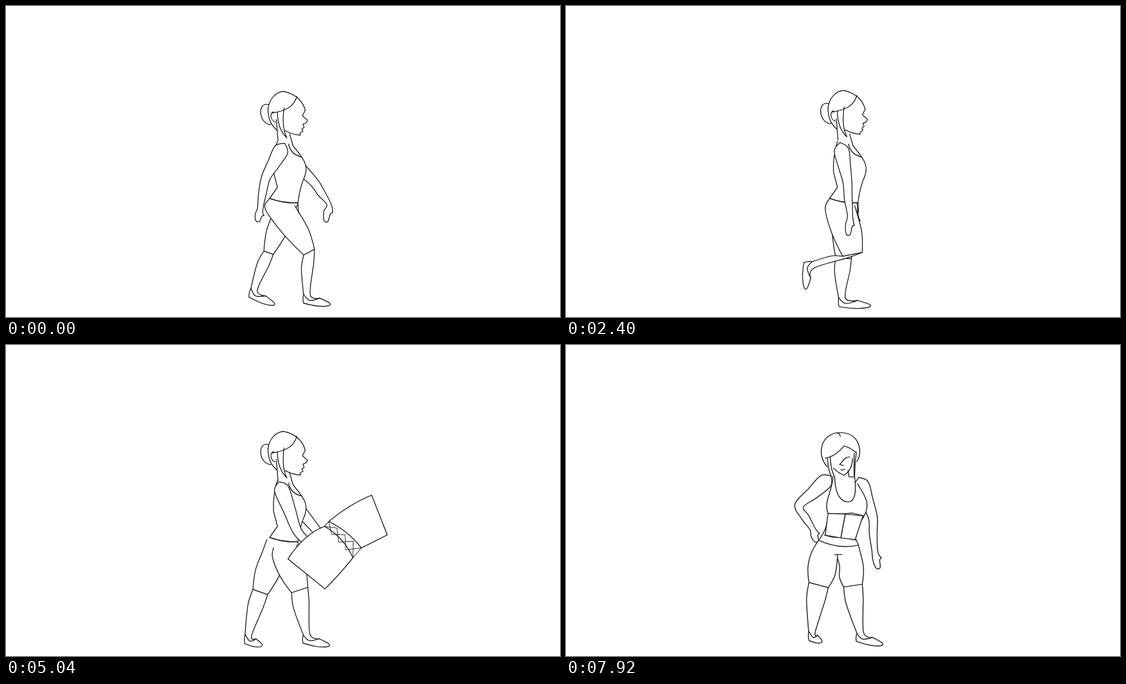
Recreate the animation shown at these times as an HTML page with a canvas. Size 998 px wide and 561 px high, loop 8 s.

```html
<!DOCTYPE html>
<html lang="en">
<head>
<meta charset="utf-8">
<title>Walk and wrap</title>
<style>
html, body { margin: 0; width: 100%; height: 100%; overflow: hidden; background: #fff; }
canvas { display: block; }
</style>
</head>
<body>
<canvas id="stage" width="998" height="561"></canvas>
<script>
const ctx = document.getElementById('stage').getContext('2d');
const LOOP = 8000, STEP = 120, CYCLE = 12, STOP = 35, TURN = 43;

const clamp = (v, lo, hi) => Math.min(hi, Math.max(lo, v));
const ramp = (frame, start, length) => clamp((frame - start) / length, 0, 1);
const mix = (a, b, t) => a.map((v, i) => v + (b[i] - v) * t);
const corner = p => [p[0], p[1], true];

// Interpolates rows of [time, pose].
function at(keys, time) {
  const t = clamp(time, keys[0][0], keys[keys.length - 1][0]);
  const i = keys.findIndex((key, n) => n && key[0] >= t);
  const [t0, a] = keys[i - 1], [t1, b] = keys[i];
  return mix(a, b, (t - t0) / (t1 - t0));
}
const cyclic = keys => [...keys, [CYCLE, keys[0][1]]];

// Point at fraction t along a-b, pushed d towards the front of the limb.
function side(a, b, t, d) {
  const dx = b[0] - a[0], dy = b[1] - a[1], length = Math.hypot(dx, dy) || 1;
  return [a[0] + dx * t + dy / length * d, a[1] + dy * t - dx / length * d];
}

// Smooth white shape through points; corners have no tangent.
function outline(pts) {
  const slope = i => {
    if (pts[i][2]) return [0, 0];
    const a = pts[Math.max(0, i - 1)], b = pts[Math.min(pts.length - 1, i + 1)];
    return [(b[0] - a[0]) / 6, (b[1] - a[1]) / 6];
  };
  ctx.beginPath();
  ctx.moveTo(pts[0][0], pts[0][1]);
  for (let i = 1; i < pts.length; i++) {
    const p = pts[i - 1], q = pts[i], u = slope(i - 1), v = slope(i);
    ctx.bezierCurveTo(p[0] + u[0], p[1] + u[1], q[0] - v[0], q[1] - v[1], q[0], q[1]);
  }
  ctx.fill();
  ctx.stroke();
}
const line = path => ctx.stroke(new Path2D(path));
function solid(path) {
  const shape = new Path2D(path);
  ctx.fill(shape);
  ctx.stroke(shape);
}

// Leg pose: knee x, y, half width; ankle x, y; foot angle in degrees, foot length
const walkLeg = cyclic([
  [0, [546, 444, 11, 542, 520, 0, 1]],
  [2, [500, 455, 14, 497, 526, -4, 1.2]],
  [3, [485, 454, 12, 475, 525, -3, 1.1]],
  [5, [461, 458, 10, 430, 529, 5, 0.8]],
  [6, [473, 445, 9, 447, 511, 13, 1]],
  [8, [516, 448, 18, 445, 467, 83, 1]],
  [9, [540, 441, 14, 470, 453, 76, 1]],
  [11, [541, 450, 14, 553, 525, 0, 1]]
]);
const standLeft = [455, 433, 18, 443, 517, -4, 0.4];
const standRight = [517, 434, 17, 530, 519, 4, 1];

// Hips: back of waist, seat, front of waist
const hips = {
  near: [475, 347, 467, 366, 520, 360], far: [485, 350, 482, 370, 525, 358],
  left: [455, 352, 442, 375, 489, 384], right: [489, 384, 493, 400, 527, 362]
};

function leg(hip, [kx, ky, kneeWidth, ax, ay, angle, footLength]) {
  const back = hip.slice(0, 2), seat = hip.slice(2, 4), front = hip.slice(4);
  const knee = [kx, ky], ankle = [ax, ay], root = mix(back, front, 0.5);
  const kneeBack = side(root, knee, 1, -kneeWidth), kneeFront = side(root, knee, 1, kneeWidth);
  const ankleBack = corner(side(knee, ankle, 1, -6)), ankleFront = side(knee, ankle, 1, 6);
  const cos = Math.cos(angle * Math.PI / 180), sin = Math.sin(angle * Math.PI / 180);
  const foot = (x, y) => {
    const fx = x > 0 ? x * footLength : x;
    return [ax + fx * cos - y * sin, ay + fx * sin + y * cos];
  };
  const throat = corner(foot(23, 7));
  outline([ankleBack, foot(-7, 9), corner(foot(-6, 16)), foot(17, 21), foot(38, 21), foot(41, 16), throat]);
  outline([kneeBack, side(kneeBack, ankleBack, 0.35, -4), ankleBack, foot(5, 11), throat,
    ankleFront, side(kneeFront, ankleFront, 0.3, 1), kneeFront]);
  outline([back, seat, side(seat, kneeBack, 0.5, -4), corner(kneeBack), corner(kneeFront),
    side(front, kneeFront, 0.55, 5), front]);
}

// Arm pose: elbow x, y; wrist x, y; fingertip x, y
const walkArm = cyclic([
  [0, [468, 310, 458, 365, 454, 388]],
  [2, [513, 320, 521, 373, 521, 402]],
  [3, [525, 336, 566, 377, 575, 408]],
  [5, [557, 331, 592, 374, 598, 405]],
  [6, [555, 318, 582, 355, 577, 388]],
  [8, [507, 318, 512, 378, 509, 412]],
  [9, [473, 335, 467, 377, 463, 400]],
  [11, [445, 322, 453, 378, 455, 413]]
]);
const leftOut = [400, 268, 345, 282, 323, 280], leftHeld = [465, 306, 446, 335, 428, 340];
const leftAcross = [432, 300, 480, 328, 507, 332], leftOnHip = [420, 290, 444, 331, 452, 354];
const rightOut = [592, 272, 645, 288, 668, 284], rightHeld = [539, 318, 573, 345, 584, 358];
const rightAcross = [558, 308, 520, 327, 497, 330], rightDown = [553, 312, 556, 370, 563, 402];
const leftArm = [[45, leftOut], [49, leftHeld], [56, leftHeld], [59, leftOut], [62, leftAcross], [63, leftAcross], [66, leftOnHip]];
const rightArm = [[45, rightOut], [49, rightHeld], [50, rightHeld], [55, rightAcross], [63, rightAcross], [66, rightDown]];

function arm(shoulder, [ex, ey, wx, wy, tx, ty]) {
  const elbow = [ex, ey], wrist = [wx, wy], tip = [tx, ty], width = 13;
  const upper = (t, d) => side(shoulder, elbow, t, d);
  const bend = d => side(shoulder, wrist, 0, d).map((v, i) => v - shoulder[i] + elbow[i]);
  const hand = (t, d) => side(wrist, tip, t, d);
  const top = upper(-width / Math.hypot(ex - shoulder[0], ey - shoulder[1]), 0);
  outline([top, upper(0, -width), upper(0.5, -11), bend(-8), side(elbow, wrist, 0.5, -8),
    side(elbow, wrist, 1, -5), hand(0.5, -7), hand(1, -4), hand(1, 3), hand(0.6, 5), corner(hand(0.5, 9)),
    hand(0.1, 5), side(elbow, wrist, 0.5, 6), bend(8), upper(0.5, 11), upper(0, width), top]);
}

function sideHead() {
  line('M472 185C475 166 486 156 499 154C517 157 534 168 539 188M524 163C518 183 503 189 480 193'); // hair
  line('M473 178C452 172 455 213 477 214M472 185C472 205 478 215 488 224'); // bun
  line('M482 191C474 192 477 208 485 209M487 205L490 243'); // ear and nape
  line('M489 191Q489 222 506 238Q496 218 501 184');
  line('M539 188L534 198L543 206Q542 212 535 213L537 219L533 222L535 226L530 229V233Q516 232 503 225');
}

function turnedHead() {
  line('M479 168C461 163 453 201 470 208M472 173C463 195 470 220 484 230');
  line('M470 180C482 162 515 160 540 178Q544 190 535 196L530 187Q508 196 482 192');
  line('M484 189C475 191 478 206 485 206M486 192Q486 225 497 250Q492 225 496 195');
  line('M530 188L536 204H524M531 208L535 222L519 237Q507 231 499 227M509 234V247');
  line('M523 206L520 217H525M517 226Q521 222 525 226');
}

function frontHead() {
  line('M471 220C450 198 459 158 494 158C530 158 535 195 524 210M467 204Q484 202 501 182Q514 186 522 194');
  line('M488 158Q494 160 494 165M471 204Q472 225 478 237M476 203Q477 224 483 236M519 196V237M523 193Q520 215 520 236');
  line('M482 222Q490 231 501 235Q516 225 516 205M508 226L510 238H520');
  line('M499 209Q503 202 511 202M500 207L493 216L500 217M495 225Q499 226 502 224');
}

function flyingWrap(frame) {
  const travel = Math.min(frame, 39) - STOP;
  ctx.save();
  ctx.translate(860 - 65 * travel, 292 + 15 * travel);
  ctx.rotate(-0.35 * travel);
  ctx.translate(-860, -292);
  solid('M811 207Q860 228 880 262Q866 300 833 322Q800 304 769 282Z');
  solid('M890 268Q926 298 950 336L884 376L853 334Q880 304 890 268Z');
  const a = t => [880 - 47 * t, 262 + 60 * t], b = t => [890 - 37 * t, 268 + 66 * t];
  ctx.lineWidth = 1;
  ctx.beginPath();
  for (let i = 0; i < 4; i++) {
    for (const [from, to] of [[a, b], [b, a]]) {
      ctx.moveTo(...from(i / 4));
      ctx.lineTo(...to((i + 1) / 4));
    }
  }
  for (const t of [0, 1]) { ctx.moveTo(...a(t)); ctx.lineTo(...b(t)); }
  ctx.stroke();
  ctx.restore();
}

// A flap hangs from the hand until it is folded to the middle seam.
function flap(loose, fitted, pose, folded) {
  const x = (pose[2] + pose[4]) / 2, y = (pose[3] + pose[5]) / 2 - 8;
  const inner = mix(loose, fitted, folded);
  const outer = mix([x, y, x + 5, y + 50], [503, 305, 495, 348], folded ** 4);
  outline([inner.slice(0, 2), outer.slice(0, 2), outer.slice(2), inner.slice(2), inner.slice(0, 2)].map(corner));
}

function legs(frame) {
  const phase = Math.min(frame, STOP) % CYCLE, turn = ramp(frame, 39, 6);
  return [
    () => leg(mix(hips.far, hips.left, turn), mix(at(walkLeg, (phase + 6) % CYCLE), standLeft, turn)),
    () => leg(mix(hips.near, hips.right, turn), mix(at(walkLeg, phase), standRight, turn))
  ];
}

function sideView(frame) {
  const phase = Math.min(frame, STOP) % CYCLE, shoulder = [496, 259];
  const reach = clamp((frame - STOP) * 0.7, 0, 4);
  const [farLeg, nearLeg] = legs(frame);
  arm(shoulder, at(walkArm, (phase + 6) % CYCLE));
  farLeg();
  solid('M489 244Q480 275 482 300L489 327L475 347Q498 356 526 355Q528 335 535 315C549 287 535 275 517 252L511 231');
  nearLeg();
  line('M475 347Q498 356 526 355L527 373M509 249Q513 268 532 272');
  arm(shoulder, at(walkArm, (phase + reach) % CYCLE));
  ctx.save();
  ctx.translate(0, -2 * Math.sin(phase * Math.PI / 3));
  sideHead();
  ctx.restore();
  if (frame > 31) flyingWrap(frame);
}

function frontView(frame) {
  const left = at(leftArm, frame), right = at(rightArm, frame);
  const rightFold = ramp(frame, 50, 5), leftFold = ramp(frame, 57, 5), facing = frame > 52;
  const layers = [
    [facing, () => flap([526, 350, 533, 387], [535, 308, 521, 351], right, rightFold)],
    [leftFold > 0.5, () => flap([455, 345, 452, 384], [472, 304, 467, 343], left, leftFold)],
    [facing && frame < 65, () => arm([532, 251], right)],
    [leftFold > 0.5 && frame < 65, () => arm([468, 245], left)]
  ];
  const paint = inFront => layers.forEach(([isFront, layer]) => isFront === inFront && layer());
  paint(false);
  legs(frame).forEach(drawLeg => drawLeg());
  solid('M481 237C480 265 462 285 473 305Q470 335 455 352Q490 369 527 361L521 348Q525 325 535 312C552 285 536 270 525 250');
  line('M484 237C485 275 498 283 508 283C524 283 522 255 520 238');
  line('M484 378H497M489 378V384');
  if (!facing) line('M503 313Q507 309 514 309M472 300L479 311');
  if (leftFold === 1) line('M472 304Q504 305 515 303L536 308M466 343Q480 348 496 347L523 352');
  paint(true);
  (facing ? frontHead : turnedHead)();
}

function render(now) {
  const frame = Math.floor(now % LOOP / STEP), front = frame >= TURN;
  ctx.fillStyle = '#fff';
  ctx.fillRect(0, 0, 998, 561);
  ctx.lineJoin = ctx.lineCap = 'round';
  ctx.strokeStyle = front ? '#2c2c2c' : '#111';
  ctx.lineWidth = front ? 1.7 : 1.4;
  (front ? frontView : sideView)(frame);
  requestAnimationFrame(render);
}
requestAnimationFrame(render);
</script>
</body>
</html>
```
